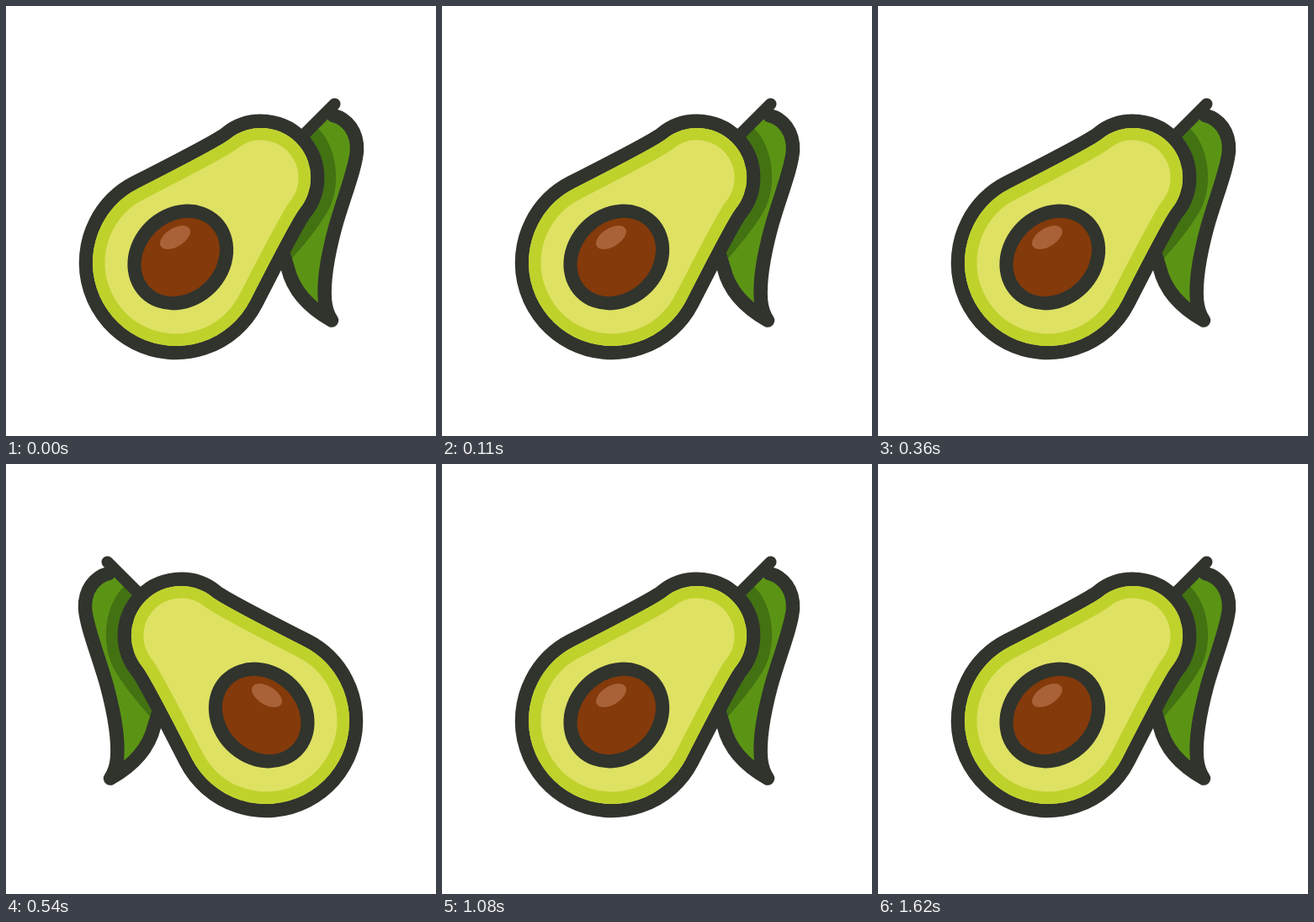
An HTML page with a canvas for the animation above (1.98 s loop, 511 by 511 pixels).

```html
<!DOCTYPE html>
<html lang="en">
<head>
<meta charset="utf-8">
<title>Avocado</title>
<style>
  html, body { margin: 0; width: 100%; height: 100%; overflow: hidden; background: #fff; }
  canvas { display: block; width: 100%; height: 100%; }
</style>
</head>
<body>
<canvas id="stage" width="511" height="511"></canvas>
<script>
const SIZE = 511;
const LOOP = 1980;
const INK = '#30342d';
const ctx = document.getElementById('stage').getContext('2d');
ctx.lineJoin = ctx.lineCap = 'round';

// Left open at the stem, which covers the gap.
const leaf = new Path2D(
  'M389 130 C405 134 418 149 417 172 C415 195 401 228 391 264 ' +
  'C382 298 377 325 379 350 C380 360 383 368 387 373.5 ' +
  'C363 360 342 341 335 312 L325 280 L350 157');
const leafShade = new Path2D(
  'M370 145 C393 165 401 215 380 248 C369 266 354 284 340 300 L320 280 L350 150 Z');
const stem = new Path2D('M350 157 L390.5 116.5');
const flesh = makeFlesh();

// Two circles on a horizontal axis, joined by slightly hollow flanks.
function makeFlesh() {
  const big = 99, small = 59, gap = 143;
  const a = 72 * Math.PI / 180, b = 84 * Math.PI / 180;
  const reach = small + gap * Math.cos(b);
  const bendX = (big * Math.sin(b) - reach * Math.sin(a)) / Math.sin(b - a);
  const bendY = (reach * Math.cos(a) - big * Math.cos(b)) / Math.sin(b - a);
  const p = new Path2D();
  p.arc(0, 0, big, a, -a);
  p.quadraticCurveTo(bendX, -bendY, gap + small * Math.cos(b), -small * Math.sin(b));
  p.arc(gap, 0, small, -b, b);
  p.quadraticCurveTo(bendX, bendY, big * Math.cos(a), big * Math.sin(a));
  p.closePath();
  return p;
}

function stroke(path, color, width) {
  ctx.strokeStyle = color;
  ctx.lineWidth = width;
  ctx.stroke(path);
}

function fill(path, color) {
  ctx.fillStyle = color;
  ctx.fill(path);
}

function oval(x, y, rx, ry, degrees, color) {
  const p = new Path2D();
  p.ellipse(x, y, rx, ry, degrees * Math.PI / 180, 0, Math.PI * 2);
  fill(p, color);
}

function drawLeaf() {
  fill(leaf, '#5b9415');
  ctx.save();
  ctx.clip(leaf);
  fill(leafShade, '#437212');
  ctx.restore();
  stroke(leaf, INK, 16.5);
  stroke(stem, INK, 14);
}

function drawFlesh() {
  ctx.save();
  ctx.translate(202, 305);
  ctx.rotate(-Math.PI / 4);
  stroke(flesh, INK, 32.5);
  fill(flesh, '#dfe163');
  ctx.clip(flesh);
  stroke(flesh, '#bfd22c', 29);
  ctx.restore();
}

function drawPit() {
  oval(207.3, 298.5, 67, 58.5, -45, INK);
  oval(207.3, 298.5, 51, 42, -45, '#843a0a');
  oval(201, 275, 20, 11, -32, '#a96238');
}

function isFlipped(t) {
  return (t >= 180 && t < 360) || (t >= 540 && t < 1080);
}

function draw(t) {
  ctx.fillStyle = '#fff';
  ctx.fillRect(0, 0, SIZE, SIZE);
  ctx.save();
  if (isFlipped(t)) {
    ctx.translate(SIZE, 0);
    ctx.scale(-1, 1);
  }
  drawLeaf();
  drawFlesh();
  drawPit();
  ctx.restore();
}

let start;
function tick(now) {
  if (start === undefined) start = now;
  draw((now - start) % LOOP);
  requestAnimationFrame(tick);
}
draw(0);
requestAnimationFrame(tick);
</script>
</body>
</html>
```
